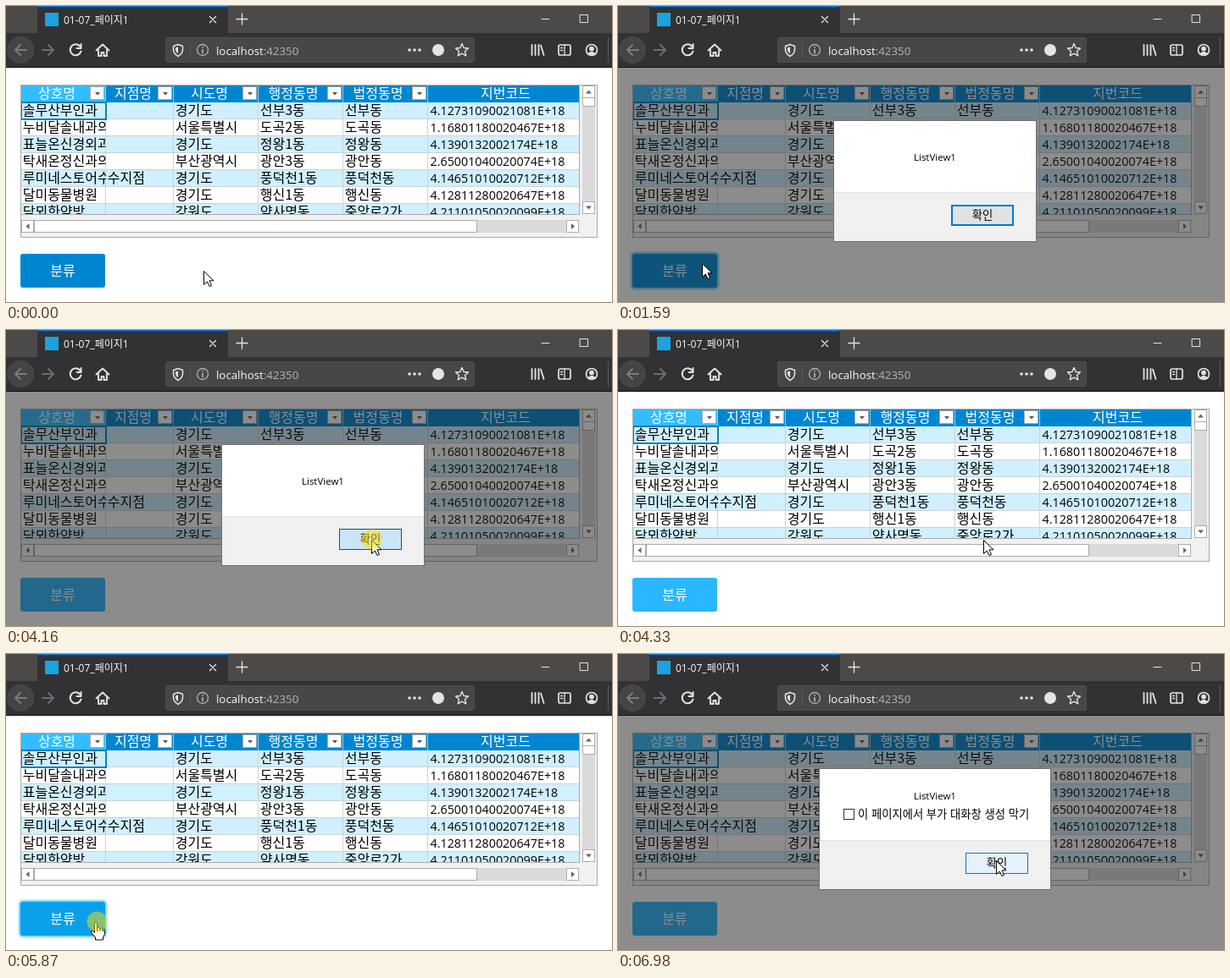
Write an HTML page that moves like this. It is 715 by 350 pixels and loops after 8000 ms.

```html
<!DOCTYPE html>
<html lang="ko">
<head>
<meta charset="utf-8">
<title>ListView</title>
<style>
  html, body { margin: 0; width: 100%; height: 100%; overflow: hidden; background: #fff; }
  svg { display: block; }
  text { font-family: "Noto Sans CJK KR", "Noto Sans CJK JP", "Noto Sans CJK", sans-serif; font-size: 16px; font-weight: 350; white-space: pre; }
  .ui, .code { font-family: "Open Sans", "Noto Sans CJK KR", "Noto Sans CJK JP", sans-serif; font-weight: 400; }
  .code { font-size: 14.3px; }
  .small { font-size: 13.3px; }
  .mid { text-anchor: middle; }
  .icon { fill: none; stroke: #e4e4e6; stroke-width: 1.7; stroke-linejoin: round; stroke-linecap: round; }
  .box { fill: #fff; stroke: #ababab; }
  #ring { filter: blur(1px); }
</style>
</head>
<body>
<svg id="stage" width="715" height="350" viewBox="0 0 715 350">
  <!-- browser window -->
  <rect width="715" height="33" fill="#4c4a48"/>
  <rect y="32" width="715" height="41" fill="#323234"/>
  <rect x="37" width="225" height="33" fill="#323234"/>
  <rect x="37" width="225" height="1" fill="#0a84ff"/>
  <rect y="72" width="715" height="1" fill="#0c0c0d"/>
  <rect x="46" y="8" width="16" height="16" fill="#1ba3dd"/>
  <text class="ui" x="68" y="20.5" fill="#f9f9fa" style="font-size:12px">01-07_페이지1</text>
  <rect x="188.5" y="37.5" width="364" height="29" rx="2" fill="#474749" stroke="#4d4d4f"/>
  <text class="ui small" x="248" y="57.5" fill="#f9f9fa">localhost<tspan fill="#b6b6b8">:42350</tspan></text>
  <circle cx="17" cy="52" r="15.5" fill="#444446" stroke="#4c4c4e"/>
  <path d="M710.5 37v30" stroke="#5c5c5e"/>
  <g class="icon">
    <path d="M240.5 12.5l7 7m0-7l-7 7M272 15.5h13m-6.500-6.500v13" stroke-width="1.3"/>
    <path d="M632 15.500h9M677.500 10.500h9v9h-9z" stroke-width="1" stroke-linejoin="miter"/>
    <path d="M24 52H11m6-6l-6 6 6 6" stroke="#7c7c7e" stroke-width="2"/>
    <path d="M43 52h13m-6-6l6 6-6 6" stroke="#6f6f71" stroke-width="2"/>
    <path d="M87.500 48a6.500 6.500 0 1 0 1 5.500M88.500 45v5h-5" stroke-width="2"/>
    <path d="M106.500 52.500l7.500-7 7.500 7M109 52v7h3.500v-4h3v4h3.500v-7" stroke-width="1.9"/>
    <path d="M203 45.500l5.500 2v4q0 5-5.500 8-5.500-3-5.500-8v-4z" stroke-width="1.5"/>
    <path d="M203 48.500v8q-3-2-3-5v-2.200z" fill="#e4e4e6" stroke="none"/>
    <circle cx="232" cy="52" r="6.500" stroke="#b1b1b3" stroke-width="1.300"/>
    <path d="M232 51.500v4M232 48.700v.1" stroke="#b1b1b3"/>
    <path d="M217.500 44v16" stroke="#5c5c5e" stroke-width="1"/>
    <path d="M538 44.500l2.200 5 5.300.5-4 3.600 1.200 5.400-4.700-2.800-4.700 2.800 1.200-5.400-4-3.600 5.300-.5z" stroke-width="1.400"/>
    <path d="M620.500 46v12M624.500 46v12M628.500 46v12M631 46.500l3.500 11.500" stroke-width="1.800"/>
    <rect x="652" y="46" width="14" height="12" rx="2"/>
    <path d="M659 46v12M654.500 49.500h2M654.500 52.500h2" stroke-width="1.300"/>
    <circle cx="691" cy="52" r="6.500"/>
    <path d="M687 57q4-5 8 0z" fill="#e4e4e6"/>
    <circle cx="691" cy="50.500" r="2" fill="#e4e4e6"/>
  </g>
  <g fill="#e4e4e6">
    <circle cx="476" cy="52" r="1.800"/><circle cx="482" cy="52" r="1.800"/><circle cx="488" cy="52" r="1.800"/>
    <circle cx="510" cy="52" r="7"/>
  </g>

  <!-- list view -->
  <rect x="17.5" y="93.5" width="680" height="180" fill="#f1f1f1" stroke="#ababab"/>
  <svg x="18" y="94" width="659" height="152.500"><g id="grid" transform="translate(-18 -94)"></g></svg>
  <path d="M18 246.500H677M676.500 94V246" stroke="#ababab"/>
  <rect x="680" y="94" width="15" height="152" fill="#dadada"/>
  <rect x="18" y="253" width="658" height="15" fill="#dadada"/>
  <g class="box">
    <rect x="680.5" y="94.5" width="14" height="14"/><rect x="680.5" y="108.5" width="14" height="10"/>
    <rect x="680.5" y="231.500" width="14" height="14"/>
    <rect x="18.5" y="253.500" width="14" height="14"/><rect x="33.5" y="253.500" width="522" height="14"/>
    <rect x="661.500" y="253.500" width="14" height="14"/>
  </g>
  <path d="M684 103.500l3.500-4 3.500 4zM684 236.500l3.500 4 3.500-4zM27.500 257l-4 3.500 4 3.500zM667 257l4 3.500-4 3.500z" fill="#666"/>

  <!-- page button -->
  <rect id="ring" x="15" y="291" width="104" height="44" rx="5" fill="#6fcdf9"/>
  <rect id="button" x="17" y="293" width="100" height="40" rx="3"/>
  <text class="mid" x="67" y="319" fill="#fff">분류</text>

  <rect id="shade" y="73" width="715" height="277" fill="#1a1a1a" opacity=".5"/>

  <!-- alert -->
  <g id="alert">
    <rect id="panel" y="135.500" height="143" fill="#fff" stroke="#707070"/>
    <rect id="footer" y="220" height="58" fill="#f0f0f0"/>
    <path id="rule" stroke="#dfdfdf"/>
    <text id="message" class="ui" x="349" style="font-size:11.500px">ListView1</text>
    <g id="option">
      <rect x="266.500" y="183.500" width="12" height="12" fill="#fff" stroke="#333"/>
      <text class="small" x="283" y="193.500">이 페이지에서 부가 대화창 생성 막기</text>
    </g>
    <rect id="ok"/>
    <text id="okText" class="mid small" y="252">확인</text>
  </g>

  <g id="cursor" fill="#fff" stroke="#000" stroke-linejoin="round">
    <path id="arrow" d="M.5.5V16.500L4.300 13 7 18.500 9.500 17.500 7 11.800H12Z"/>
    <path id="hand" d="M-2.500 12.500V1.500Q-2.500 0 -1 0T.5 1.500V7Q2.500 5.500 4 7.500 6 6.500 7.200 8.500 9.500 8 9.500 10.500V14.500L7.500 18V21H-1.500V18L-6.500 12.500Q-7 10-4.500 10.500ZM.5 7v4M4 7.500V11M7.200 8.500V11"/>
  </g>
  <circle id="click" r="12" fill="#ffe100" opacity=".5"/>
</svg>
<script>
const LOOP = 8000;
const $ = id => document.getElementById(id);
const set = (node, attrs) => { for (const k in attrs) node.setAttribute(k, attrs[k]); return node; };
const show = (id, on) => set($(id), { visibility: on ? 'inherit' : 'hidden' });

function add(parent, tag, attrs, text) {
  const node = set(document.createElementNS('http://www.w3.org/2000/svg', tag), attrs);
  if (text) node.textContent = text;
  return parent.appendChild(node);
}

function buildGrid() {
  const grid = $('grid');
  const edges = [18, 118, 198, 298, 398, 498, 677];
  const heads = ['상호명', '지점명', '시도명', '행정동명', '법정동명', '지번코드'];
  const centers = [60, 150, 240, 339, 439, 589.5];
  const rows = [
    ['솔무산부인과', '', '경기도', '선부3동', '선부동', '4.12731090021081E+18'],
    ['누비달솔내과의', '', '서울특별시', '도곡2동', '도곡동', '1.16801180020467E+18'],
    ['표늘온신경외과', '', '경기도', '정왕1동', '정왕동', '4.1390132002174E+18'],
    ['탁새온정신과의', '', '부산광역시', '광안3동', '광안동', '2.65001040020074E+18'],
    ['루미네스토어수', '수지점', '경기도', '풍덕천1동', '풍덕천동', '4.14651010020712E+18'],
    ['달미동물병원', '', '경기도', '행신1동', '행신동', '4.12811280020647E+18'],
    ['담뫼한약방', '', '강원도', '약사명동', '중앙로2가', '4.21101050020099E+18']
  ];
  heads.forEach((head, c) => {
    const x = edges[c], width = edges[c + 1] - x;
    add(grid, 'rect', { x, y: 94, width, height: 20, fill: c ? '#0086d1' : '#33bdff' });
    add(grid, 'text', { class: 'mid', x: centers[c], y: 108.5, fill: '#fff' }, head);
    if (c < 5) {
      const right = edges[c + 1];
      add(grid, 'rect', { class: 'box', x: right - 18.5, y: 95.5, width: 16, height: 15 });
      add(grid, 'path', { d: `M${right - 13} 102h6l-3 3.5z`, fill: '#555' });
    }
    rows.forEach((row, r) => {
      const cell = add(grid, 'svg', { x, y: 114 + 20 * r, width, height: 20 });
      add(cell, 'rect', { width, height: 20, fill: r % 2 ? '#fff' : '#d0f0ff' });
      add(cell, 'path', { d: `M0 19.5H${width - .5}V0`, fill: 'none', stroke: '#d0d0d0' });
      add(cell, 'text', { x: c === 5 ? 2.5 : 1.7, y: 14.5, class: c === 5 ? 'code' : '' }, row[c]);
    });
    if (c) add(grid, 'path', { d: `M${x - .5} 94v20`, stroke: '#8ccbed' });
  });
  add(grid, 'rect', { x: 18, y: 114, width: 100, height: 20, fill: 'none', stroke: '#0b80b8', 'stroke-width': 2 });
}

// start, end, number of jumps, destination
const moves = [
  [500, 960, 7, 99, 304],
  [2140, 2850, 10, 431, 248],
  [4390, 4940, 8, 107, 317],
  [6280, 6660, 6, 446, 231],
  [6830, 6980, 3, 446, 244]
];
const NORMAL = [0, 134, 209], HOVER = [42, 183, 255], PRESSED = [10, 160, 233], DEEP = [2, 143, 219];
const tints = [
  [0, NORMAL], [760, NORMAL], [960, HOVER], [1420, HOVER], [1480, PRESSED], [1590, DEEP],
  [1649, DEEP], [1650, HOVER], [4390, HOVER], [4580, NORMAL], [4780, NORMAL], [4940, HOVER],
  [5820, HOVER], [5870, PRESSED], [5959, PRESSED], [5960, DEEP], [6039, DEEP], [6040, HOVER], [LOOP, HOVER]
];

const within = (t, ...spans) => spans.some(([from, to]) => t >= from && t < to);
const inside = (p, x, y, w, h) => p.x >= x && p.x < x + w && p.y >= y && p.y < y + h;
const ease = u => u * u * (3 - 2 * u);

function cursorAt(t) {
  let x = 233, y = 313;
  for (const [start, end, jumps, toX, toY] of moves) {
    if (t < start) break;
    const jump = Math.min(jumps, 1 + Math.floor((t - start) / (end - start) * (jumps - 1) + 1e-6));
    const u = ease(jump / jumps);
    x += (toX - x) * u;
    y += (toY - y) * u;
  }
  return { x: Math.round(x), y: Math.round(y) };
}

function tintAt(t) {
  const i = tints.findIndex(([time]) => time > t);
  const [t0, a] = tints[i - 1], [t1, b] = tints[i];
  return `rgb(${a.map((v, k) => Math.round(v + (b[k] - v) * (t - t0) / (t1 - t0)))})`;
}

function drawAlert(t, pointer) {
  const second = t >= 5960;
  const left = second ? 238 : 255, width = second ? 272 : 238, okX = second ? 410 : 393;
  set($('panel'), { x: left - .5, width: width + 1 });
  set($('footer'), { x: left, width });
  set($('rule'), { d: `M${left} 220.5h${width}` });
  set($('message'), { y: second ? 172 : 183 });
  show('option', second);
  const pressed = within(t, [4160, 4330]);
  const hover = inside(pointer, okX, 235, 74, 25);
  const line = hover ? 1 : 2;
  set($('ok'), {
    x: okX + line / 2, y: 235 + line / 2, width: 74 - line, height: 25 - line,
    fill: pressed ? '#cce4f7' : hover ? '#e5f1fb' : '#e1e1e1',
    stroke: pressed ? '#005499' : '#0078d7', 'stroke-width': line
  });
  set($('okText'), { x: okX + 37 });
}

function draw(t) {
  const pointer = cursorAt(t);
  const modal = within(t, [1590, 4330], [5960, LOOP]);
  const hand = !modal && inside(pointer, 17, 293, 100, 40);
  show('shade', modal);
  show('alert', modal);
  if (modal) drawAlert(t, pointer);
  else show('option', false);
  show('ring', within(t, [1480, 1650], [5870, 6040]));
  set($('button'), { fill: tintAt(t) });
  show('click', within(t, [1420, 1590], [4160, 4330], [5820, 5960]));
  set($('click'), { cx: pointer.x + .5, cy: pointer.y - .5 });
  set($('cursor'), { transform: `translate(${pointer.x} ${pointer.y})` });
  show('hand', hand);
  show('arrow', !hand);
}

buildGrid();
const begin = performance.now();
function tick() {
  draw((performance.now() - begin) % LOOP);
  requestAnimationFrame(tick);
}
tick();
</script>
</body>
</html>
```
